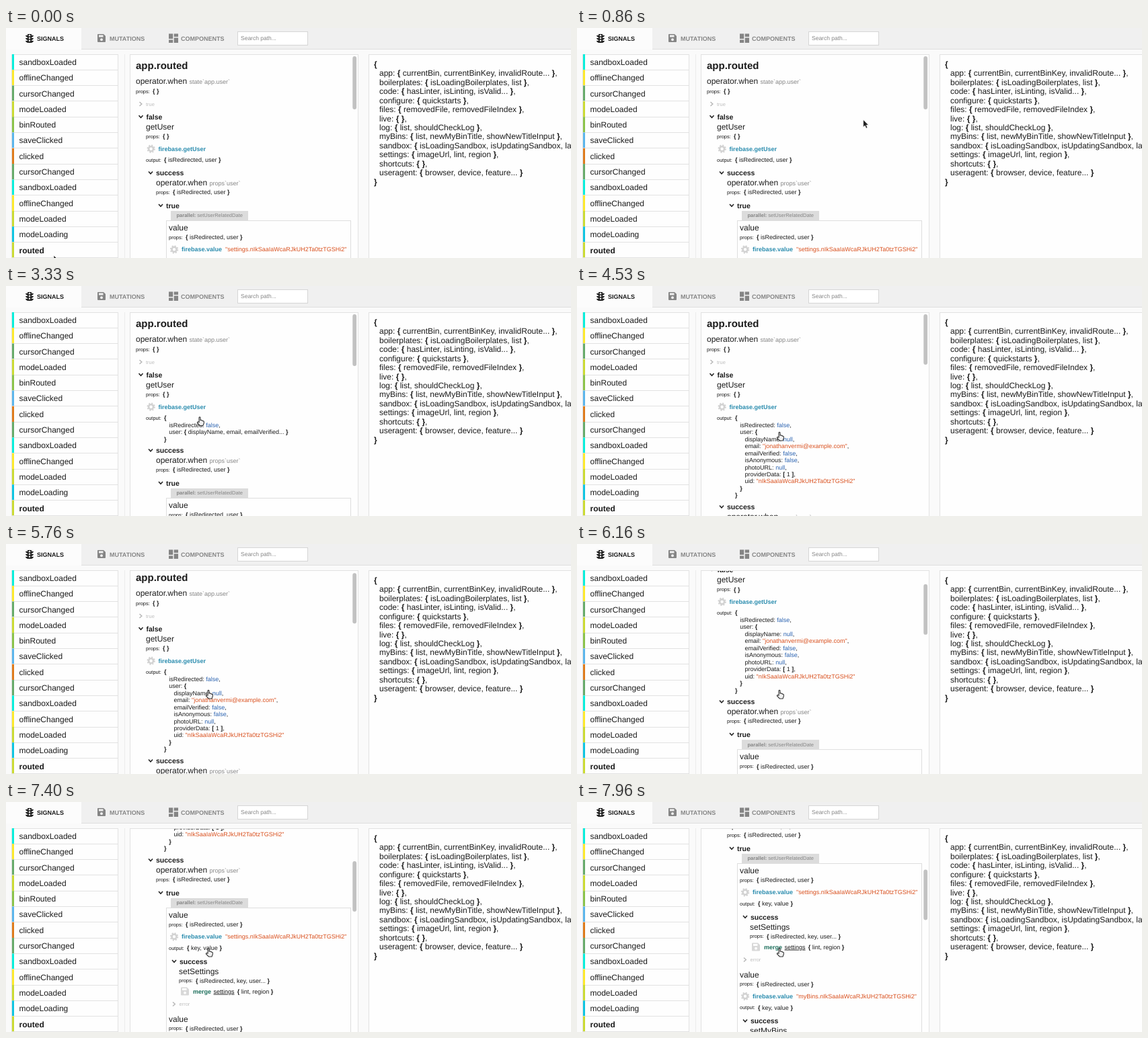
An HTML page that plays this animation: 840 px wide and 342 px high, repeating every 8 s.

```html
<!DOCTYPE html>
<html lang="en">
<head>
<meta charset="utf-8">
<title>Signal debugger</title>
<style>
  html, body { margin: 0; width: 100%; height: 100%; overflow: hidden; background: #fafafa; }
  svg { display: block; width: 840px; height: 342px; }
  text {
    font-family: "Liberation Sans", Arial, sans-serif; white-space: pre; fill: #1c1c1c;
    text-rendering: geometricPrecision;
  }
  .b { font-weight: bold; }
  .lit { fill: #2a62b0; }
  .str { fill: #d9501e; }
  .act { font-weight: bold; fill: #2a8cae; }
  .mut { font-weight: bold; fill: #1d6f5c; }
  .dim { fill: #858585; }
  .off { fill: #c0c0c0; }
  .u { text-decoration: underline; }
</style>
</head>
<body>
<svg id="stage" viewBox="0 0 840 342"></svg>
<script>
const LOOP = 8000;
const UID = 'nIkSaaIaWcaRJkUH2Ta0tzTGSHi2';

// Drawing helpers: y is the vertical middle of a line of text
const span = (s, cls) => `<tspan class="${cls}">${s}</tspan>`;
const text = (x, y, size, s, cls = '') =>
  `<text x="${x}" y="${y + size * .35}" font-size="${size}" class="${cls}">${s}</text>`;
const rect = (x, y, w, h, fill, more = '') =>
  `<rect x="${x}" y="${y}" width="${w}" height="${h}" fill="${fill}" ${more}/>`;
const json = s => s.replace(/"[^"]*"|[{}[\]]|\b(false|null)\b/g, m =>
  span(m, m[0] === '"' ? 'str' : m.length > 1 ? 'lit' : 'b'));
const code = (x, y, s) => text(x, y, 9, json(s));
const chevron = (x, y, open, color) =>
  `<path d="M-2-3 1.3 0-2 3" transform="translate(${x} ${y}) rotate(${open ? 90 : 0})"
    fill="none" stroke="${color}" stroke-width="1.5"/>`;
const gear = (x, y) =>
  `<g fill="none" stroke="#d2d2d2"><circle cx="${x}" cy="${y}" r="3.5" stroke-width="2.6"/>
   <circle cx="${x}" cy="${y}" r="5.3" stroke-width="1.8" stroke-dasharray="2.08"/></g>`;
const floppy = (x, y, color, hole) =>
  `<path d="M-6-5q0-1 1-1H3L6-3V5q0 1-1 1H-5q-1 0-1-1Z" transform="translate(${x} ${y})" fill="${color}"/>` +
  rect(x - 4, y - 4.5, 6.5, 3, hole) + `<circle cx="${x}" cy="${y + 2.3}" r="2" fill="${hole}"/>`;

// Rows of the signal tree
const branch = (x, y, name, open = true) => open
  ? chevron(x, y, true, '#222') + text(x + 8, y, 10.5, name, 'b')
  : chevron(x, y, false, '#b8b8b8') + text(x + 7.5, y, 7.5, name, 'off');
const props = (x, y, s, label = 'props:') =>
  text(x, y, 7.5, label) + code(x + (label === 'props:' ? 25 : 27), y, s);
const action = (x, y, name, s = '') =>
  gear(x + 7, y) + text(x + 18, y, 9, span(name, 'act') + json(s));
const valueBlock = (y, path) =>
  text(242, y, 12, 'value') +
  props(242, y + 14.3, '{ isRedirected, user }') +
  action(243, y + 32.3, 'firebase.value', `  "${path}.${UID}"`) +
  props(242, y + 49, '{ key, value }', 'output:') +
  branch(250, y + 69, 'success');

function header() {
  const tab = (x, s, cls) => text(x, 15.5, 9, s, 'b ' + cls);
  const lamps = [11.2, 15, 18.8].map(y => `<circle cx="35" cy="${y}" r="1.3" fill="#fdfdfd"/>`).join('');
  return rect(0, 0, 840, 31, '#f0f0f0') + rect(0, 31, 840, 1, '#dedede') +
    rect(0, 0, 112, 32, '#fcfcfc') +
    '<path d="M32 9h6v2h3q0 2-3 3v1h3q0 2-3 3v1h3q0 2-3 3h-6q-3-1-3-3h3v-1q-3-1-3-3h3v-1q-3-1-3-3h3Z" fill="#222"/>' +
    lamps + tab(46, 'SIGNALS', '') +
    floppy(142, 15, '#858585', '#f0f0f0') + tab(154, 'MUTATIONS', 'dim') +
    rect(242, 8.5, 6.2, 7.5, '#858585') + rect(249.7, 8.5, 6.3, 4.5, '#858585') +
    rect(242, 17.5, 6.2, 4.5, '#858585') + rect(249.7, 14.5, 6.3, 7.5, '#858585') +
    tab(260, 'COMPONENTS', 'dim') +
    rect(344.5, 5.5, 104, 20, '#fff', 'stroke="#d6d6d6"') + text(349, 15.5, 8.5, 'Search path...', 'dim');
}

function signalList() {
  const colors = {
    sandboxLoaded: '#08efdc', offlineChanged: '#fde92c', cursorChanged: '#67ab6a',
    modeLoaded: '#cbdb33', binRouted: '#8bc34a', saveClicked: '#5bb6ec',
    clicked: '#df7b1c', modeLoading: '#0fc5e2', routed: '#cbdb33'
  };
  const names = ('sandboxLoaded offlineChanged cursorChanged modeLoaded binRouted saveClicked clicked ' +
    'cursorChanged sandboxLoaded offlineChanged modeLoaded modeLoading routed').split(' ');
  return rect(176, 39, 1, 303, '#ebebeb') +
    rect(8.5, 39.5, 158, 320, '#fefefe', 'stroke="#e2e2e2"') + names.map((name, i) => {
    const y = 39 + i * 23.3;
    return rect(9, y, 3, 23.3, colors[name]) + rect(9, Math.round(y + 22.8), 158, 1, '#e2e2e2') +
      text(19.5, y + 11.7, 12, name, name === 'routed' ? 'b' : '');
  }).join('');
}

function statePanel() {
  const lines = [
    'app: { currentBin, currentBinKey, invalidRoute... },',
    'boilerplates: { isLoadingBoilerplates, list },',
    'code: { hasLinter, isLinting, isValid... },',
    'configure: { quickstarts },',
    'files: { removedFile, removedFileIndex },',
    'live: { },',
    'log: { list, shouldCheckLog },',
    'myBins: { list, newMyBinTitle, showNewTitleInput },',
    'sandbox: { isLoadingSandbox, isUpdatingSandbox, lastChange... },',
    'settings: { imageUrl, lint, region },',
    'shortcuts: { },',
    'useragent: { browser, device, feature... }'
  ];
  const line = (s, i) => text(i % 13 ? 555 : 547, 53.5 + i * 13.47, 12, json(s));
  return rect(539.5, 39.5, 310, 320, '#fefefe', 'stroke="#e2e2e2"') +
    ['{', ...lines, '}'].map(line).join('');
}

// The three ways the output of getUser is shown
const outputs = [
  ['{ isRedirected, user }'],
  ['{', ' isRedirected: false,', ' user: { displayName, email, emailVerified... }', '}'],
  ['{', ' isRedirected: false,', ' user: {', '  displayName: null,',
    '  email: "jonathanvermi@example.com",', '  emailVerified: false,', '  isAnonymous: false,',
    '  photoURL: null,', '  providerData: [ 1 ],', `  uid: "${UID}"`, ' }', '}']
];
const growth = [0, 29, 113];

const outputView = lines => '<g class="out">' + lines.map((s, i) => {
  const depth = s.search(/\S/);
  return code(235 + depth * 7.3, 196 + i * 10.48, s.trim());
}).join('') + '</g>';

function signalTree() {
  const head =
    text(193, 55.5, 15, 'app.routed', 'b') +
    text(193, 79, 12, 'operator.when') + text(272.5, 80, 9, 'state`app.user`', 'dim') +
    props(193, 94, '{ }') +
    branch(200.5, 113, 'true', false) + branch(200.5, 132, 'false') +
    text(208, 147, 12, 'getUser') + props(208, 161.3, '{ }') +
    action(208.6, 179.7, 'firebase.getUser') +
    text(208, 196, 7.5, 'output:');
  const tail =
    branch(215, 215.5, 'success') +
    text(223, 230, 12, 'operator.when') + text(302.5, 230.5, 9, 'props`user`', 'dim') +
    props(223, 244, '{ isRedirected, user }') +
    branch(230, 264, 'true') +
    rect(245, 272, 115, 14, '#dcdcdc') +
    text(253.5, 278.8, 7.5, span('parallel:', 'b') + ' setUserRelatedDate', 'dim') +
    rect(238.5, 286.5, 274, 400, 'none', 'stroke="#dedede"') +
    valueBlock(297, 'settings') +
    text(257, 380.5, 12, 'setSettings') +
    props(257, 394.5, '{ isRedirected, key, user... }') +
    floppy(266, 410.5, '#d8d8d8', '#fefefe') +
    text(278, 410.5, 9, span('merge', 'mut')) + text(308.5, 410.5, 9, 'settings', 'u') +
    code(343.8, 410.5, '{ lint, region }') +
    branch(250, 429.5, 'error', false) +
    valueBlock(451.5, 'myBins') +
    text(257, 534.5, 12, 'setMyBins');
  return rect(184.5, 39.5, 339, 320, '#fefefe', 'stroke="#e2e2e2"') +
    '<clipPath id="view"><path d="M185 40H514V342H185Z"/></clipPath>' +
    `<g clip-path="url(#view)"><g id="scroll">${head}${outputs.map(outputView).join('')}<g id="tail">${tail}</g></g></g>` +
    rect(515.3, 42, 5.8, 79, '#c2c2c2', 'rx="2.9" id="thumb"');
}

const pointer =
  '<path id="arrow" d="M0 0V11.3L2.6 9 4.4 13 6.4 12.2 4.7 8.2H8Z" fill="#222" stroke="#fff" stroke-width=".7"/>' +
  `<path id="hand" d="M3 8V1.6Q3 .4 4 .4T5 1.6V5q1.6-.8 2 .6 1.4-.5 1.7.7 1.6-.3 1.6 1.2v2L9 13H4.3L.6 9.2Q0 7.8 1.4 7.6Z"
    fill="#f0f0f0" stroke="#333" stroke-width="1.1"/>`;

const stage = document.getElementById('stage');
stage.innerHTML = rect(0, 0, 840, 342, '#fafafa') + header() + signalList() + signalTree() + statePanel() + pointer;
const [scroller, tail, thumb, arrow, hand] =
  ['scroll', 'tail', 'thumb', 'arrow', 'hand'].map(id => document.getElementById(id));
const outs = stage.querySelectorAll('.out');

// Key poses: [time, value, ...]
const cursorKeys = [
  [100, 71, 338], [220, 110, 312], [400, 215, 228], [620, 345, 150], [780, 412, 124], [900, 432, 142],
  [1300, 432, 142], [1460, 421, 148], [1630, 421, 148], [1740, 360, 175], [1860, 299.5, 204],
  [1960, 298, 212], [2130, 298, 212], [2560, 284, 194.5], [3760, 284, 194.5], [3900, 297, 217]
];
const scrollKeys = [
  [5330, 0], [5560, 5], [5730, 5], [5760, 6], [5830, 6], [5950, 32], [6160, 93], [6300, 215],
  [6499, 215], [6500, 236], [7199, 236], [7200, 239], [7399, 239], [7400, 242], [7520, 242], [7950, 308]
];

function pose(keys, t) {
  const i = keys.findIndex(k => k[0] > t);
  if (i === 0) return keys[0].slice(1);
  if (i < 0) return keys[keys.length - 1].slice(1);
  const [a, b] = [keys[i - 1], keys[i]];
  const p = (t - a[0]) / (b[0] - a[0]);
  return a.slice(1).map((v, j) => v + (b[j + 1] - v) * p);
}

function draw(now) {
  const t = now % LOOP;
  const level = t < 3330 ? 0 : t < 4530 ? 1 : 2;
  const [scroll] = pose(scrollKeys, t);
  const [x, y] = pose(cursorKeys, t);
  const pointing = t >= 2400;

  outs.forEach((g, i) => g.setAttribute('display', i === level ? 'inline' : 'none'));
  tail.setAttribute('transform', `translate(0 ${growth[level]})`);
  scroller.setAttribute('transform', `translate(0 ${-scroll})`);
  thumb.setAttribute('y', 42 + scroll * .19);
  thumb.setAttribute('height', 79 - level * 2);
  for (const [shape, on] of [[arrow, !pointing], [hand, pointing]]) {
    shape.setAttribute('display', on ? 'inline' : 'none');
    shape.setAttribute('transform', `translate(${x} ${y})`);
  }
  requestAnimationFrame(() => draw(performance.now() - start));
}
const start = performance.now();
draw(0);
</script>
</body>
</html>
```
